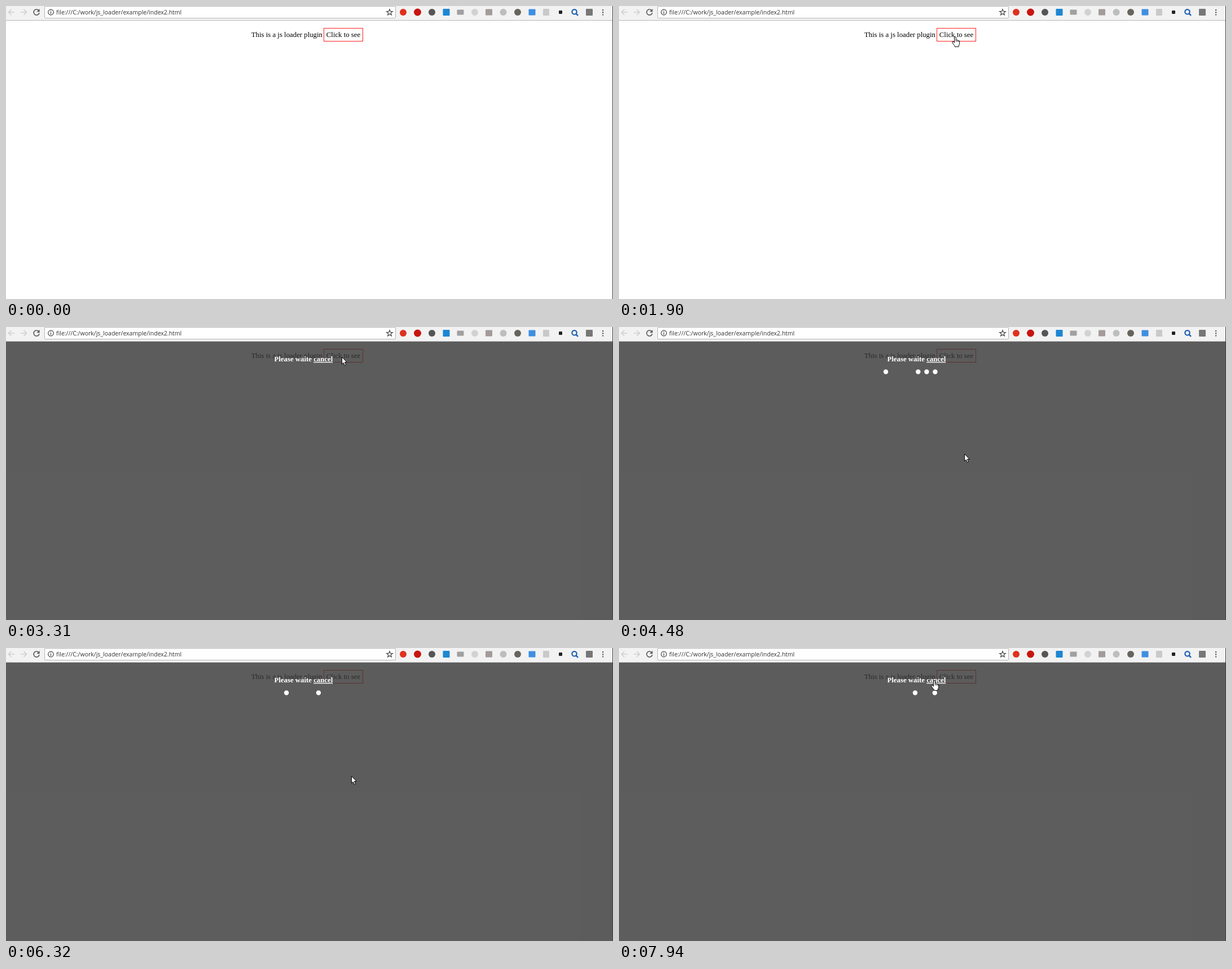
Write an HTML page that moves like this. It is 1076 by 520 pixels and loops after 8 s.

```html
<!DOCTYPE html>
<html lang="en">
<head>
<meta charset="utf-8">
<title>Loader demo</title>
<style>
  html, body { margin: 0; width: 100%; height: 100%; overflow: hidden; background: #fff; }
  svg { display: block; width: 1076px; height: 520px; }
  .page { font: 12.8px "Liberation Serif", serif; }
  .url { font: 10.53px "Open Sans", sans-serif; fill: #333; }
  .line { fill: none; stroke-width: 1.6; }
  #click { mix-blend-mode: multiply; }
</style>
</head>
<body>
<svg viewBox="0 0 1076 520">
  <rect width="1076" height="520" fill="#fff"/>

  <g class="page">
    <text x="434.8" y="55">This is a js loader plugin</text>
    <text x="567.8" y="55">Click to see</text>
    <rect x="563.5" y="39.5" width="69" height="23" fill="none" stroke="#f22"/>
  </g>

  <g id="overlay" class="page">
    <rect y="26" width="1075" height="494" fill="#343434" fill-opacity=".8"/>
    <text x="475.5" y="61" fill="#fff" font-weight="bold">Please waite <tspan text-decoration="underline">cancel</tspan></text>
    <g id="dots" fill="#fff"></g>
  </g>

  <g id="toolbar">
    <rect width="1076" height="25" fill="#f2f2f2"/>
    <rect y="25" width="1076" height="1" fill="#b6b6b6"/>
    <path class="line" stroke="#cfcfcf" d="M15 11H4.500M9.500 6L4.500 11L9.500 16M26 11H36.500M31.500 6L36.500 11L31.500 16"/>
    <path class="line" stroke="#5a5a5a" d="M58 7.800A5 5 0 1 0 59 12"/>
    <path fill="#5a5a5a" d="M59.600 5V10.300H54.300Z"/>
    <rect x="68.500" y=".5" width="622" height="21" rx="1.500" fill="#fff" stroke="#b4b4b4"/>
    <circle cx="79.500" cy="11" r="4.800" fill="none" stroke="#444" stroke-width="1.200"/>
    <path stroke="#444" stroke-width="1.300" d="M79.500 10.200V14M79.500 8V9.300"/>
    <text class="url" x="89" y="15">file:///C:/work/js_loader/example/index2.html</text>
    <path id="star" fill="none" stroke="#444" stroke-width="1.200"/>
    <g id="icons"></g>
    <circle cx="1007.500" cy="10.300" r="4.200" fill="none" stroke="#1d5fb0" stroke-width="2.200"/>
    <path stroke="#1d5fb0" stroke-width="2.500" d="M1010.500 13.300L1014 16.800"/>
    <path fill="#555" d="M1057 6h2.200v2.200h-2.200zM1057 10.200h2.200v2.200h-2.200zM1057 14.400h2.200v2.200h-2.200z"/>
  </g>
  <rect x="1075" width="1" height="520" fill="#3c3c3c"/>

  <g id="cursor" fill="#fff" stroke="#000" stroke-linejoin="round">
    <path id="arrow" d="M.5 .5V13L3.300 10.400L5.300 15.300L7.500 14.400L5.500 9.600H9.400Z"/>
    <g id="hand">
      <path d="M-.5 11V2Q-.5 .5 .9 .5T2.300 2V6.500Q3.600 5.300 4.700 6.900Q6 6 6.900 7.600Q8.600 7.200 8.600 9V12.500Q8.600 14.500 7.200 16V18.300H.3V16.800Q-2 14.500 -4.200 11Q-4.700 9.300 -3.300 9.100Q-2 9.200 -.5 11Z"/>
      <path fill="none" stroke-width=".8" d="M2.300 6.500V9.500M4.700 7V9.800M6.900 7.800V10"/>
    </g>
  </g>
  <circle id="click" cx="594" cy="54" r="10" fill="#faf350"/>
</svg>
<script>
const LOOP = 8000, OPEN = 3310, STEP = 77.2;
const NS = "http://www.w3.org/2000/svg";
const $ = id => document.getElementById(id);
const show = (node, on) => node.setAttribute("display", on ? "inline" : "none");
const mix = (a, b, k) => a + (b - a) * k;

function add(parent, tag, attrs) {
  const node = document.createElementNS(NS, tag);
  for (const key in attrs) node.setAttribute(key, attrs[key]);
  return parent.appendChild(node);
}

// Toolbar buttons: plain marks as [x, width, height, colour, round]
[
  [704, 12, 12, "#e0301e", 1], [729.5, 13, 13, "#c8140f", 1],
  [755, 12, 12, "#555", 1], [780.5, 12, 12, "#1e86d2", 0],
  [805.5, 12, 9, "#a0a0a0", 0], [831, 12, 12, "#d2d2d2", 1],
  [856, 12, 11, "#a39a9a", 0], [881.5, 12, 12, "#bdbdbd", 1],
  [907, 12, 12, "#66645c", 1], [932.5, 12, 11, "#3f8fe0", 0],
  [957.5, 11, 12, "#c9c9c9", 0], [983, 6, 6, "#222", 0],
  [1034, 12, 12, "#777", 0]
].forEach(([x, w, h, fill, round]) => add($("icons"), "rect", {
  x: x - w / 2, y: 11 - h / 2, width: w, height: h, fill, rx: round ? w / 2 : 1
}));

const star = Array.from({ length: 10 }, (_, i) => {
  const r = i % 2 ? 2.4 : 5.6, a = i * Math.PI / 5;
  return (680 + r * Math.sin(a)).toFixed(2) + " " + (11.3 - r * Math.cos(a)).toFixed(2);
});
$("star").setAttribute("d", "M" + star.join("L") + "Z");

const dots = Array.from({ length: 4 }, () => add($("dots"), "circle", { cy: 79.5, r: 4.2 }));

// Each dot rushes in, drifts slowly, then rushes out
const PERIOD = 2500, DELAY = 346, FIRST = 34, RUSH = 250, LEAVE = 1326;
const LEFT = 450, RIGHT = 603.5;

function dotX(i, time) {
  const start = FIRST + i * DELAY;
  if (time < start) return null;
  const life = (time - start) % PERIOD;
  const drift = age => 560.5 - 15.1 * i + (start + age - 1160) / 100;
  if (life < RUSH) return mix(LEFT, drift(RUSH), life / RUSH);
  if (life < LEAVE) return drift(life);
  if (life < LEAVE + RUSH) return mix(drift(LEAVE), RIGHT, (life - LEAVE) / RUSH);
  return null;
}

// Pointer stops: [time, x, y]
const path = [
  [520, 772, 382], [750, 760, 362], [1520, 595, 71], [1590, 595, 68],
  [1850, 595, 54], [3300, 595, 54], [3310, 595, 53], [3460, 595, 53],
  [4160, 612, 225], [5250, 612, 225], [5400, 612, 227], [6740, 612, 227],
  [7480, 598, 57], [7700, 572, 54], [7900, 558, 57]
];

function pointer(t) {
  if (t < 520) return [913, 468];
  const i = path.findIndex(p => p[0] > t);
  if (i < 0) return path[path.length - 1].slice(1);
  if (i < 2) return [772, 382];
  const [t0, x0, y0] = path[i - 1], [t1, x1, y1] = path[i];
  const u = (t - t0) / (t1 - t0), k = u * u * (3 - 2 * u);
  return [mix(x0, x1, k), mix(y0, y1, k)];
}

function draw(t) {
  const open = t >= OPEN;
  const now = open ? OPEN + Math.floor((t - OPEN + 10) / STEP) * STEP : t;
  show($("overlay"), open);
  show($("click"), t >= 3140 && !open);

  dots.forEach((dot, i) => {
    const x = open ? dotX(i, now - OPEN) : null;
    show(dot, x !== null);
    if (x !== null) dot.setAttribute("cx", x.toFixed(2));
  });

  const [x, y] = pointer(now).map(Math.round);
  const link = open ? x > 544 && x < 580 && y < 65 : x > 562 && x < 634 && y < 63;
  show($("cursor"), t >= 440);
  $("cursor").setAttribute("transform", `translate(${x} ${y})`);
  show($("arrow"), !link);
  show($("hand"), link);
}

const begin = performance.now();
function tick() {
  draw((performance.now() - begin) % LOOP);
  requestAnimationFrame(tick);
}
tick();
</script>
</body>
</html>
```
